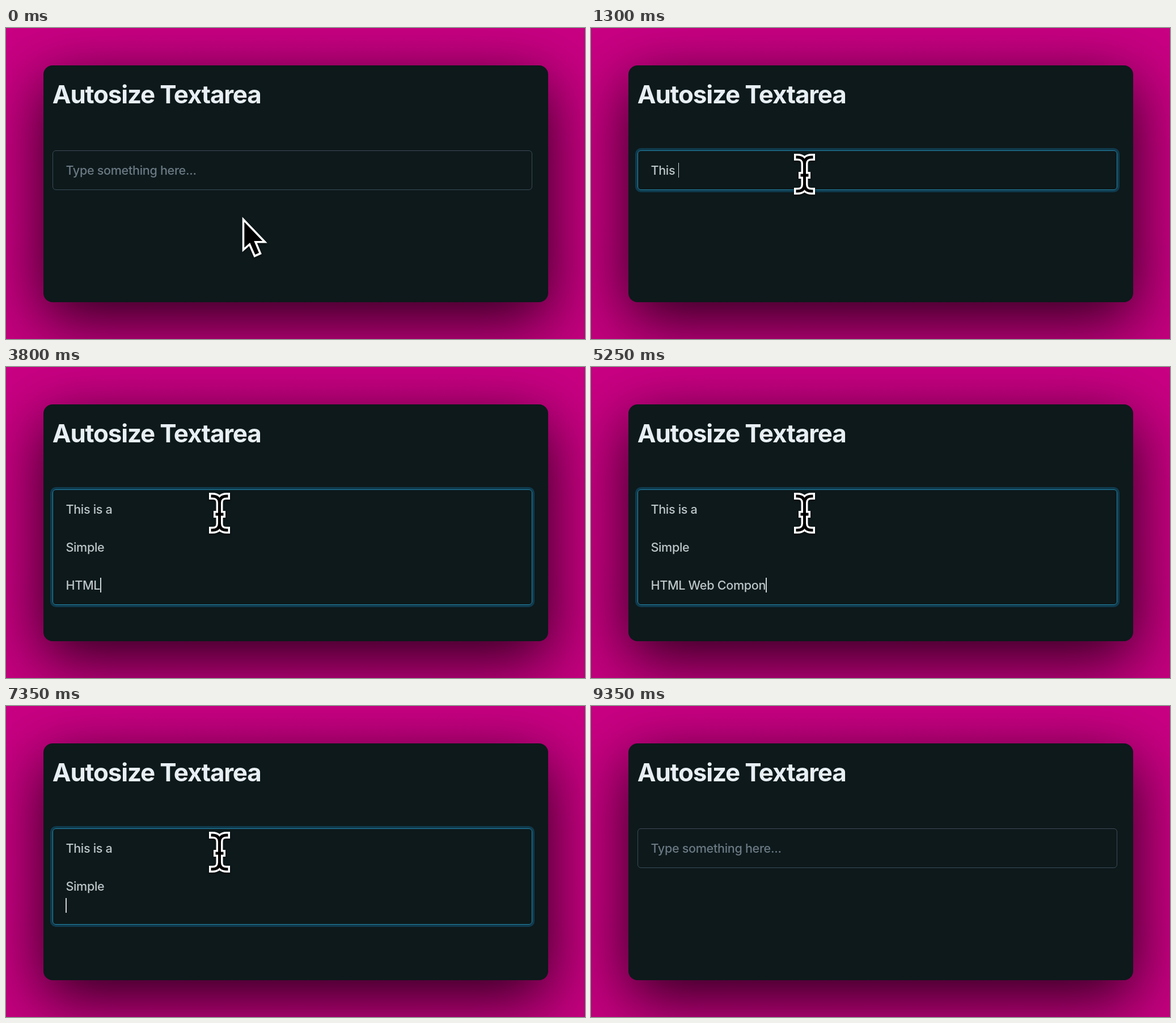
Write an HTML page that moves like this. It is 1021 px wide and 549 px high and loops after 9400 ms.

```html
<!DOCTYPE html>
<html lang="en">
<head>
<meta charset="utf-8">
<title>Autosize Textarea</title>
<style>
  html, body { margin: 0; width: 100%; height: 100%; overflow: hidden; }
  body {
    position: relative;
    background: linear-gradient(#c90083, #c5007f);
    font-family: Inter, sans-serif;
    font-optical-sizing: none;
  }
  .card {
    position: absolute; left: 65.5px; top: 66px; width: 890px; height: 417.5px;
    border-radius: 16px; background: #0d191b;
    box-shadow: 0 30px 110px rgba(0, 0, 0, .8);
  }
  h1 {
    position: absolute; left: 81.8px; top: 92px; margin: 0;
    font-size: 44px; line-height: 50px; font-weight: 700;
    letter-spacing: -.028em; white-space: nowrap; color: #e8eff4;
  }
  .field {
    position: absolute; left: 82.2px; top: 216.2px; width: 846px;
    box-sizing: border-box; padding: 18.3px 22.2px 16px;
    border: 1px solid #3c4b58; border-radius: 6px;
    font-size: 21.6px; line-height: 33.4px; font-weight: 450;
    letter-spacing: -.015em; white-space: pre; color: #bcc6ca;
  }
  .field.focus { border-color: #2585a8; box-shadow: 0 0 0 4px #0f3a4d; }
  .caret {
    display: inline-block; width: 1.4px; height: 26px; margin: 3px -1.4px 0 0;
    vertical-align: top; background: #ccd3d6;
  }
  .hint { color: #6b7983; }
  svg {
    position: absolute; left: 0; top: 0; overflow: visible;
    filter: drop-shadow(0 2px 2px rgba(0, 0, 0, .45));
  }
  #beam path { fill: none; stroke-linecap: square; }
  .rim { stroke: #fff; stroke-width: 12; }
  .core { stroke: #000; stroke-width: 5; }
</style>
</head>
<body>
<div class="card"></div>
<h1>Autosize Textarea</h1>
<div class="field" id="field"><span id="text"></span><span class="caret" id="caret"></span><span class="hint" id="hint">Type something here...</span></div>
<svg id="mouse" width="1" height="1">
  <path id="arrow" d="M1.5 3V56.5L12.5 47L21.5 67.5L31.5 63L23 42.8H39.5Z" fill="#000" stroke="#fff" stroke-width="3.6"/>
  <g id="beam"></g>
</svg>
<script>
const LOOP = 9400, FOCUS = 800, BLUR = 9000;
const $ = id => document.getElementById(id);

// Keystrokes: [start, interval, characters], or a count to erase.
const strokes = [
  [1000, 70, 'This '], [1450, 100, 'is a'], [2000, 200, '\n\n'],
  [2450, 100, 'Simple'], [3050, 150, '\n\n'],
  [3450, 100, 'HTML '], [3950, 130, 'Web '], [4600, 125, 'Compon'], [5300, 80, 'ent'],
  [5850, 50, 18], [7150, 0, 1], [7650, 0, 1], [8000, 33, 17]
];
const keys = strokes.flatMap(([start, gap, what]) =>
  Array.from({ length: what.length || what }, (_, i) =>
    ({ at: start + i * gap, char: what.length ? what[i] : null })));

// Pointer stops: [time, x, y]
const stops = [
  [0, 417, 335], [100, 417, 335], [600, 376.5, 258], [8650, 376.5, 258],
  [8750, 377, 270], [8950, 412, 395], [9050, 413, 397], [9300, 425, 570], [LOOP, 425, 570]
];

const beamShape = 'M-12.5-30C-4-30 0-26 0-18V18C0 26-4 30-12.5 30' +
  'M12.5-30C4-30 0-26 0-18M0 18C0 26 4 30 12.5 30M-4.5 2H4.5';
$('beam').innerHTML = ['rim', 'core'].map(c => `<path class="${c}" d="${beamShape}"/>`).join('');

function typedAt(t) {
  let text = '', last = FOCUS;
  for (const { at, char } of keys) {
    if (at > t) break;
    text = char === null ? text.slice(0, -1) : text + char;
    last = at;
  }
  return { text, last };
}

function pointerAt(t) {
  const i = stops.findIndex(s => s[0] > t);
  const [t0, x0, y0] = stops[i - 1], [t1, x1, y1] = stops[i];
  const p = (t - t0) / (t1 - t0), e = p * p * (3 - 2 * p);
  return [x0 + (x1 - x0) * e, y0 + (y1 - y0) * e];
}

function draw() {
  const t = performance.now() % LOOP;
  const focused = t >= FOCUS && t < BLUR;
  const { text, last } = typedAt(t);
  const caretOn = focused && (t - last) % 1000 < 500;
  const arrow = t < 420 || t >= 8700;
  const [x, y] = pointerAt(t);

  $('field').classList.toggle('focus', focused);
  $('text').textContent = text;
  $('hint').style.display = text ? 'none' : '';
  $('caret').style.visibility = caretOn ? 'visible' : 'hidden';
  $('arrow').style.display = arrow ? '' : 'none';
  $('beam').style.display = arrow ? 'none' : '';
  $('mouse').style.transform = `translate(${x}px, ${y}px)`;
  requestAnimationFrame(draw);
}
draw();
</script>
</body>
</html>
```
